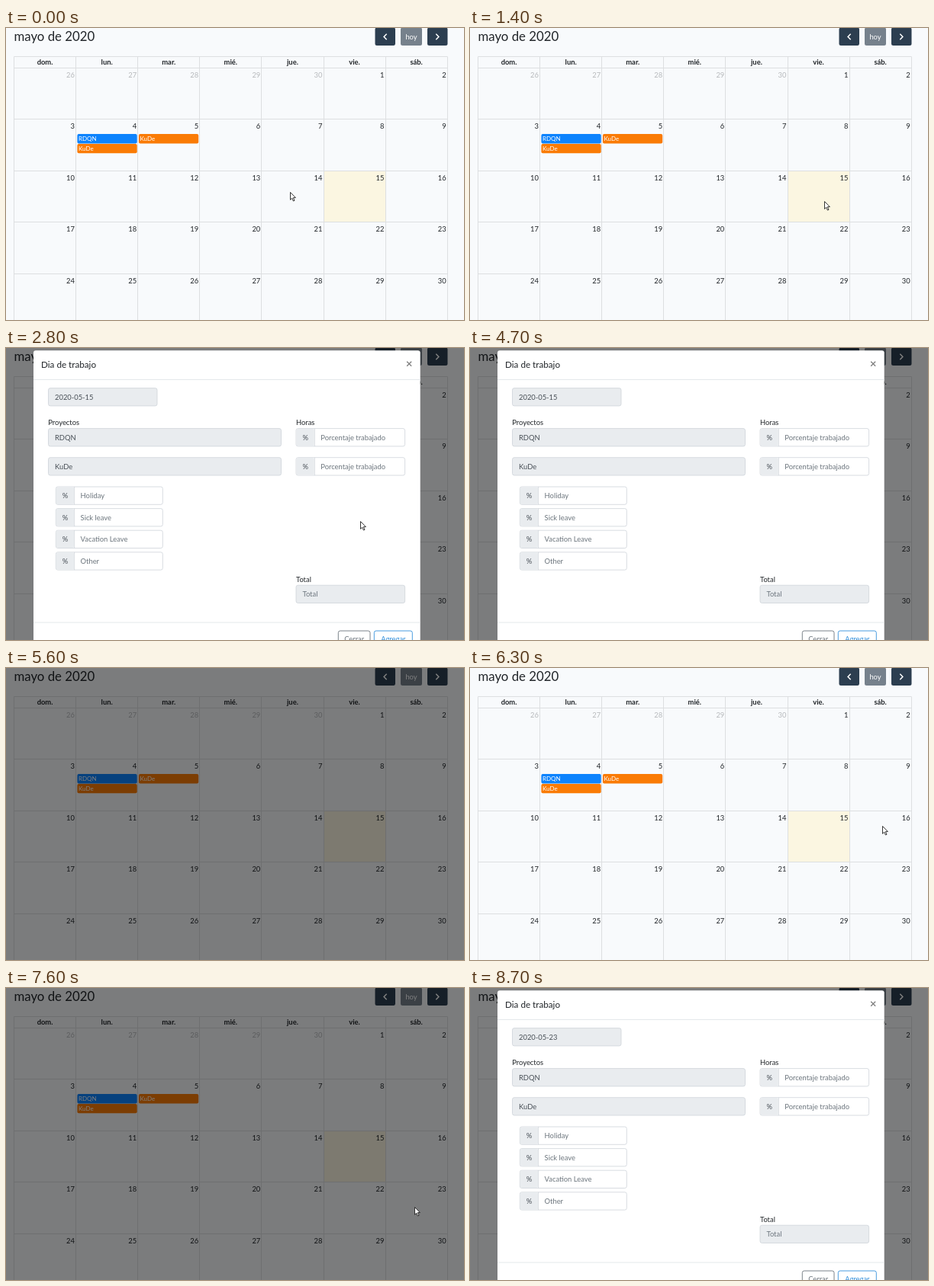
Recreate the animation shown at these times as an HTML page. Size 600x383 px, loop 9100 ms.

```html
<!DOCTYPE html>
<html lang="es">
<head>
<meta charset="utf-8">
<title>Calendario</title>
<style>
  html, body { margin: 0; width: 100%; height: 100%; overflow: hidden; background: #f8fafc; }
  svg { display: block; width: 600px; height: 383px; }
  text { font-family: Lato, "Open Sans", sans-serif; font-size: 9.4px; fill: #212529; white-space: pre; }
</style>
</head>
<body>
<svg id="stage" viewBox="0 0 600 383">
  <g id="calendar"></g>
  <rect id="shade" width="600" height="383" opacity="0"/>
  <g id="modal" opacity="0"></g>
  <path id="cursor" d="M.5 .5V10.3L2.8 8.2L4.4 12L6 11.3L4.4 7.6H7.4Z" fill="#fff" stroke="#222" stroke-width=".9" stroke-linejoin="round"/>
</svg>
<script>
const LOOP = 9100;
const $ = id => document.getElementById(id);
const calendar = $("calendar"), modal = $("modal");

function add(parent, tag, attrs, content = "") {
  const el = document.createElementNS("http://www.w3.org/2000/svg", tag);
  for (const key in attrs) el.setAttribute(key, attrs[key]);
  el.textContent = content;
  return parent.appendChild(el);
}
const box = (parent, x, y, width, height, fill, attrs = {}) =>
  add(parent, "rect", { x, y, width, height, fill, ...attrs });
const label = (parent, x, y, content, attrs = {}) => add(parent, "text", { x, y, ...attrs }, content);
const line = (parent, d, stroke, attrs = {}) => add(parent, "path", { d, stroke, fill: "none", ...attrs });

// Calendar
const LEFT = 10.5, TOP = 52, COL = 81.1, ROW = 67.6;
const centred = { "text-anchor": "middle" };

function drawCalendar() {
  label(calendar, 10.5, 17.2, "mayo de 2020", { style: "font-size:16.8px" });

  box(calendar, 483.5, -.5, 26.5, 23.5, "#2c3e50", { rx: 2.5 });
  box(calendar, 517, -.5, 28, 23.5, "#76818c", { rx: 2.5 });
  box(calendar, 552, -.5, 26.5, 23.5, "#2c3e50", { rx: 2.5 });
  label(calendar, 531, 14.8, "hoy", { ...centred, style: "fill:#fff" });
  for (const d of ["M498.7 7.8l-3.6 3.7l3.6 3.7", "M563.3 7.8l3.6 3.7l-3.6 3.7"])
    line(calendar, d, "#fff", { "stroke-width": 1.5 });

  box(calendar, LEFT + 5 * COL, TOP + 2 * ROW, COL, ROW, "#fbf6e1");

  let grid = `M${LEFT} 37.5H578.2`;
  for (let c = 0; c < 8; c++) {
    const x = Math.floor(LEFT + c * COL) + .5;
    grid += `M${x} ${c % 7 ? TOP : 37.5}V383`;
    if (c % 7) grid += `M${x} 37.5V${TOP}`;
  }
  for (let r = 0; r < 5; r++) grid += `M${LEFT} ${Math.floor(TOP + r * ROW) + .5}H578.2`;
  line(calendar, grid, "#dddfe1");

  ["dom.", "lun.", "mar.", "mié.", "jue.", "vie.", "sáb."].forEach((day, c) =>
    label(calendar, LEFT + (c + .5) * COL, 47.6, day, { ...centred, "font-weight": 700 }));

  for (let i = 0; i < 35; i++) {
    const c = i % 7, r = Math.floor(i / 7);
    label(calendar, LEFT + (c + 1) * COL - 1.6, 64.6 + r * ROW, i < 5 ? 26 + i : i - 4,
      { "text-anchor": "end", opacity: i < 5 ? .3 : 1 });
  }

  const event = (x, y, name, fill) => {
    box(calendar, x, y, 78.3, 12.3, fill, { rx: 2 });
    label(calendar, x + 1.5, y + 9, name, { style: "font-size:8px;fill:#fff" });
  };
  event(93.4, 139.1, "RDQN", "#0d83fd");
  event(93.4, 152, "KuDe", "#fa7b05");
  event(173.9, 139.1, "KuDe", "#fa7b05");
}

// Dialog
const EDGE = "#ced4da", GREY = "#e9ecef";
const dark = "fill:#495057", muted = "fill:#6c757d";

function field(x, y, width, content, fill = GREY, style = dark, indent = 8.5) {
  box(modal, x, y, width, 23.3, fill, { rx: 2.5, stroke: EDGE, "stroke-width": .8 });
  return label(modal, x + indent, y + 15.1, content, { style });
}
function percent(x, y, width, hint) {
  field(x, y, width, hint, "#fff", muted, 32.3);
  line(modal, `M${x + 24.3} ${y}v23.3`, EDGE, { "stroke-width": .8 });
  box(modal, x + .4, y + .4, 23.5, 22.5, GREY, { rx: 2 });
  label(modal, x + 12.2, y + 15.1, "%", { ...centred, style: dark });
}
function button(x, width, content, color) {
  box(modal, x, 371, width, 23.3, "#fff", { rx: 2.5, stroke: color, "stroke-width": .9 });
  label(modal, x + width / 2, 385.4, content, { ...centred, style: `fill:${color}` });
}

function drawModal() {
  box(modal, 36, 3.3, 506.7, 402, "#fff", { rx: 3 });
  line(modal, "M36 41.5H542.7M36 360H542.7", "#dee2e6", { "stroke-width": .8 });
  label(modal, 46, 26.3, "Dia de trabajo", { style: "font-size:11.7px" });
  line(modal, "M525.2 17.7l6 6m0-6l-6 6", "#7f7f7f", { "stroke-width": 1.3 });

  const first = field(55.5, 52.6, 142.5, "2020-05-15");
  const second = label(modal, 64, 67.7, "2020-05-23", { style: dark, opacity: 0 });

  label(modal, 55.3, 101.2, "Proyectos");
  label(modal, 380, 101.2, "Horas");
  ["RDQN", "KuDe"].forEach((name, i) => {
    const y = 105.6 + i * 38.1;
    field(55.5, y, 305, name);
    percent(380, y, 142.6, "Porcentaje trabajado");
  });
  ["Holiday", "Sick leave", "Vacation Leave", "Other"].forEach((name, i) =>
    percent(65.3, 182 + i * 28.6, 140, name));

  label(modal, 380, 306.8, "Total");
  field(380, 311.2, 142.6, "Total", GREY, muted);
  button(435.3, 41.7, "Cerrar", "#6c757d");
  button(482.3, 50, "Agregar", "#3490dc");
  return [first, second];
}

// Steps are [time, value, easing towards the next step]
function loop(el, prop, steps) {
  const all = [[0, steps[0][1]], ...steps, [LOOP, steps[steps.length - 1][1]]];
  el.animate(all.map(([time, value, easing = "linear"]) =>
    ({ offset: time / LOOP, [prop]: value, easing })),
    { duration: LOOP, iterations: Infinity });
}
const at = (x, y) => `translate(${x}px, ${y}px)`;

drawCalendar();
const [first, second] = drawModal();

loop($("shade"), "opacity", [
  [1440, 0], [1590, .5], [5690, .5], [5840, 0], [7440, 0], [7590, .5]
]);
loop(modal, "opacity", [
  [1680, 0], [1830, 1], [5250, 1], [5400, 0], [7680, 0], [7830, 1]
]);
loop(modal, "transform", [
  [1680, at(0, -32), "ease-out"], [1980, at(0, 0)],
  [5250, at(0, 0), "ease-out"], [5550, at(0, -32)],
  [7680, at(0, -32), "ease-out"], [7980, at(0, 0)]
]);
loop(first, "opacity", [[6500, 1, "step-end"], [6501, 0]]);
loop(second, "opacity", [[6500, 0, "step-end"], [6501, 1]]);

const smooth = "ease-in-out";
loop($("cursor"), "transform", [
  [90, at(372, 215), smooth], [420, at(440, 216)],
  [550, at(440, 216), smooth], [1000, at(464, 227)],
  [2900, at(464, 227), smooth], [3750, at(470, 300), smooth],
  [4500, at(458, 386)],
  [5800, at(458, 386), smooth], [6250, at(540, 207)],
  [6400, at(540, 207), smooth], [7000, at(535, 287)],
  [7750, at(535, 287), smooth], [8250, at(505, 388)]
]);
</script>
</body>
</html>
```
